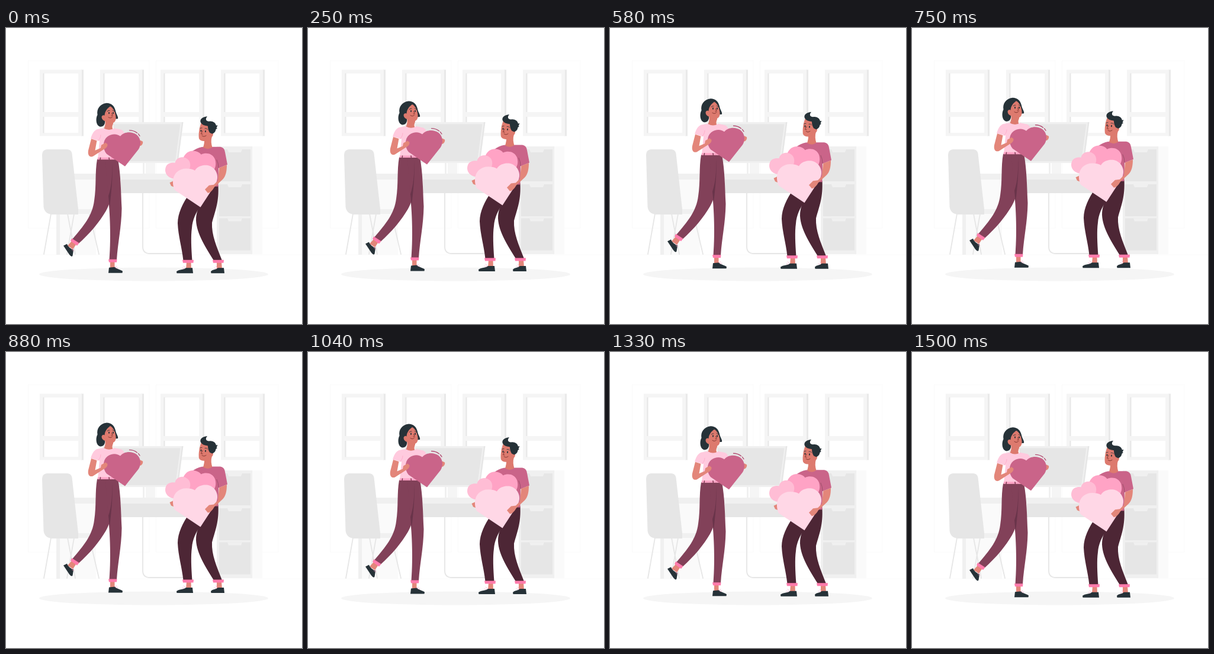
Animation of 500 by 500 pixels, one loop 1540 ms. Source, as an HTML page:

```html
<!DOCTYPE html>
<html lang="en">
<head>
<meta charset="utf-8">
<title>Carrying hearts</title>
<style>
html, body { margin: 0; width: 100%; height: 100%; overflow: hidden; background: #fff; }
svg { display: block; width: 100vw; height: 100vh; }
.skin { fill: #e3867a; }
.face { fill: #dd7a6e; }
.ink { fill: #263238; }
.cuff { fill: #ff7bac; }
.rose { fill: #ca6489; }
.plum { fill: #824159; }
.wine { fill: #4d2635; }
.line { fill: none; stroke-linecap: round; stroke-linejoin: round; }
</style>
</head>
<body>
<svg viewBox="0 0 500 500" xmlns="http://www.w3.org/2000/svg">
  <path class="line" stroke="#fafafa" d="M38 55H242V338H38ZM254 55H460V338H254ZM0 383H500"/>
  <g id="windows"></g>

  <!-- desk -->
  <path fill="#fafafa" d="M90 256H152V383H90Z"/>
  <path fill="#f0f0f0" d="M85 256H91V383H85Z"/>
  <path class="line" stroke="#e6e6e6" stroke-width="1.8" d="M231 279V369Q231 381 243 381H304"/>
  <path fill="#e6e6e6" d="M194 256H357V279H194Z"/>
  <path fill="#f0f0f0" d="M85 246H358V256H85Z"/>

  <!-- monitor -->
  <path fill="#f0f0f0" d="M231 228H234V246H231Z"/>
  <path fill="#f5f5f5" d="M236 228H252V246H236Z"/>
  <path fill="#f0f0f0" d="M180 159H299L290 228H188Z"/>
  <path fill="#e6e6e6" d="M181 162.500H294.500L286 225H189Z"/>
  <path fill="#e6e6e6" d="M297 159H299.500L290.500 228H288Z"/>

  <!-- cabinet -->
  <path fill="#fafafa" d="M415 200H433V382H415Z"/>
  <path fill="#f0f0f0" d="M356 200H416V382H356Z"/>
  <g id="drawers"></g>

  <!-- chair -->
  <path class="line" stroke="#e6e6e6" stroke-width="1.8" d="M76 314L64 382M104 314L117 382M115 314L103 382M141 314L157 382"/>
  <path fill="#f0f0f0" d="M112 306H146Q151 307 152 314H112Z"/>
  <path fill="#e6e6e6" d="M69 205H103Q110 205 111.500 212L122 306V315H78Q65 314 63.500 302L61 214Q61 206 69 205Z"/>

  <ellipse cx="249.500" cy="416" rx="193.500" ry="11.500" fill="#f5f5f5"/>

  <g id="people">
    <g id="woman">
      <path class="skin" d="M112 359L119 365L113 374L104 368Z"/>
      <path class="ink" d="M97 368L103 365C105 370 109 373 114 375L112.500 385Q111 388 107 383Z"/>
      <path class="line" stroke="#ff9fc5" stroke-width=".7" d="M111 374L114 373.500M112 376L115 376.500"/>
      <path class="plum" d="M154 222H181C183 258 181 288 169 309C158 328 142 347 122 365L112 357C131 335 146 317 149 292C153 267 150 244 154 222Z"/>
      <path class="cuff" d="M111 355.500L123.500 363.500L120 368L109 360Z"/>
      <path class="skin" d="M176 394H183.500V407H176Z"/>
      <path class="ink" d="M174 405L184 404C187 407.500 193 408 197 411L196.500 414H173Z"/>
      <path class="line" stroke="#ff9fc5" stroke-width=".7" d="M184 404.500L187 402.500M186 406L189 405"/>
      <path class="plum" d="M168 222H189C194 248 194 275 195.500 305C195 337 189 362 187 392H174.500C178 350 175 304 172 280Z"/>
      <path fill="#69344a" d="M179 229C180 251 178 269 173 284L175 304C178 276 181 249 179 229Z"/>
      <path class="cuff" d="M173 391H187.500L187 396H174Z"/>

      <path class="face" d="M167 154H181V162Q178 168 181 172Q174 177 165 171Q169 164 167 154Z"/>
      <path fill="#ffcade" d="M165 169.500Q174 175 183 169.500L195 172Q201 175 201 186L188 222H155L158 191L143 187C146 178 149 172 156 171Z"/>
      <path class="line" stroke="#ffb0cd" d="M155 191Q160 187 160 181"/>
      <path fill="#ffa3c5" d="M155 219H188.500V222.500H154.500Z"/>
      <path class="line" stroke="#824159" stroke-width="1.600" d="M159.500 219.500L159 223M174 219.500L174.500 223"/>
      <path class="ink" d="M154.500 147C152.500 137 159 128 170 127C178 127 183 132 185 140C186 146 190 150 189 153.500L184 154L175 150L167 157C168 162 165 167 159.500 167C152 166 151 153 154.500 147Z"/>
      <path class="face" d="M166 157Q161.500 155 161.500 150Q163 146 166.500 148C167 141 171 136 176 132.500C181 135 184 141 185.200 148C187 157 183 161 178 161Q171 160 166 157Z"/>
      <g class="line" stroke="#263238">
        <path stroke-width="1.800" d="M174 143V144.500M181 143V144.500"/>
        <path stroke-width=".8" d="M171 141Q173 139 175 139.500M180 139L183 141"/>
        <path stroke-width=".9" stroke="#7b302c" d="M173 151Q177 154 180 150M178.500 144L180 148L178 148.500"/>
      </g>
      <path class="skin" d="M222 193L227 190L231 192Q232 196 228 199L222 200Z"/>
      <path class="rose" d="M201 234L170 213C163 205 163 190 171 184C179 178 188 179 193 183C200 175 212 175 220 180C228 186 229 197 224 205Z"/>
      <path class="skin" d="M144 187.500L139 207C137.500 216 142 219 147 217L164 206C169 204 173 199 171 196L168 194L161 198L160 203L150.500 207L153.500 190.500Z"/>
      <path class="line" stroke="#b24e72" stroke-width="1.300" d="M208.500 173Q216 173 221.500 177.500M223.500 179L226 182.500"/>
    </g>

    <g id="man">
      <path class="skin" d="M305 395H312.500L313 408H304ZM356 395H364L365 408H356Z"/>
      <path class="ink" d="M288 411.500C292 408 300 409 304 405.500H315L316 414.500H288.500ZM346 411.500C349 408 354 409 358 405.500H368L369 414.500H346.500Z"/>
      <path class="line" stroke="#ff9fc5" stroke-width=".7" d="M303 405L300 402.500M301 407L298 405.500M357 405L354 402.500M355 407L352 405.500"/>
      <path class="wine" d="M309 281C299 296 290 313 290 330C291 352 297 370 299.500 393H314.500C313 372 312 352 314 338C315 324 321 311 330 299L340 275Z"/>
      <path class="wine" d="M358.500 266C360 293 354 308 348 329C347 350 356 370 365 393H351C337 370 322 348 321 325C321 312 325 303 330 296L337 266Z"/>
      <path class="cuff" d="M298 392H317L316.500 397H299ZM349 392H368L367.500 397H350Z"/>

      <path class="face" d="M335 183H348Q345 193 349 203Q341 208 332 204Q336 196 335 183Z"/>
      <path class="rose" d="M332 201Q341 208 349 201L362 201Q369 202 370 210L374 231L359 237L358.500 268H322L313 210Q321 203 332 201Z"/>
      <path class="line" stroke="#9e4e6b" d="M359 236Q359 229 356 223"/>
      <path class="face" d="M330 160C326 170 325 180 326 187Q329 192.500 338 191L344 186Q349 185 350 180Q350 176 346 177L345 162Z"/>
      <path class="ink" d="M340 149.500C332 150 326.500 155 329 160C331 164 336 165 341 166C341 170 342 174 344 177L348 179C352 178 354 175 354.500 171.500L357 169.500L355.500 169L357.500 164.500L355 165C354 160 349 157 343 158C338 158 336 154 340 149.500Z"/>
      <g class="line" stroke="#263238">
        <path stroke-width="1.800" d="M329.500 173V174.500M337 174V175.500"/>
        <path stroke-width=".8" d="M328 169.500L331 169M336 170Q339 169 340.500 171.500"/>
        <path stroke-width=".9" stroke="#7b302c" d="M331 182Q334 185 338 182M332 174L329.500 179L332 179.500"/>
      </g>

      <path fill="#ffa3c5" d="M299 221C303 209 313 206 321 208.500Q327 210 329.500 214C338 210 349 212 353 222C356 232 353 238 349 244L322 250L303 240Z"/>
      <path fill="#ffbdd5" d="M284 255C271 253 267 243 270 235C272 229 279 227 285.500 228C287 220 296 216 304 220C312 224 313 233 309 241L294 255Z"/>
      <path class="skin" d="M276.500 261.500L284 258V269L279 267Z"/>
      <path fill="#ffd7e6" d="M328.500 303L285 274C279 261 281 242 300 238Q312 237 319 241C324 233 334 231 342 232.500C352 235 358 245 357 254Q356 262 352 267Z"/>
      <path class="skin" d="M360 236.500L373 231.500C373 243 371 251 366 256L352 269Q347 278 341 279L336 273L343 266L351 265L358 258Z"/>
    </g>
  </g>
</svg>
<script>
const $ = id => document.getElementById(id);
const box = (x, y, w, h, fill) =>
  `<rect x="${x}" y="${y}" width="${w}" height="${h}" fill="${fill}"/>`;

const pane = (x, y, h) => box(x + 5.5, y, 60, h, '#e6e6e6') + box(x + 7.5, y, 58, h, '#fff');
const frame = x =>
  box(x + 70, 70.5, 4, 112, '#e9e9e9') + box(x, 70.5, 71, 112, '#f5f5f5') +
  pane(x, 76.5, 65.5) + pane(x, 150, 27.5);
$('windows').innerHTML = [0, 1, 2, 3].map(i => frame(57 + i * 102)).join('');

const drawer = y =>
  box(360, y, 53, 54, '#e6e6e6') +
  `<path fill="#f0f0f0" d="M374 ${y}H399L397 ${y + 5}H376Z"/>`;
$('drawers').innerHTML = [205, 264, 321.5].map(drawer).join('');

const LOOP = 1540, PEAK = 725, LIFT = 10;

// steady rise to the peak, then steady fall
function draw(t) {
  const away = Math.abs((t - PEAK + LOOP * 1.5) % LOOP - LOOP / 2);
  const y = 0.4 - LIFT * (1 - away / (LOOP / 2));
  $('people').setAttribute('transform', `translate(0 ${y.toFixed(2)})`);
}

const start = performance.now();
function tick() {
  draw((performance.now() - start) % LOOP);
  requestAnimationFrame(tick);
}
tick();
</script>
</body>
</html>
```
